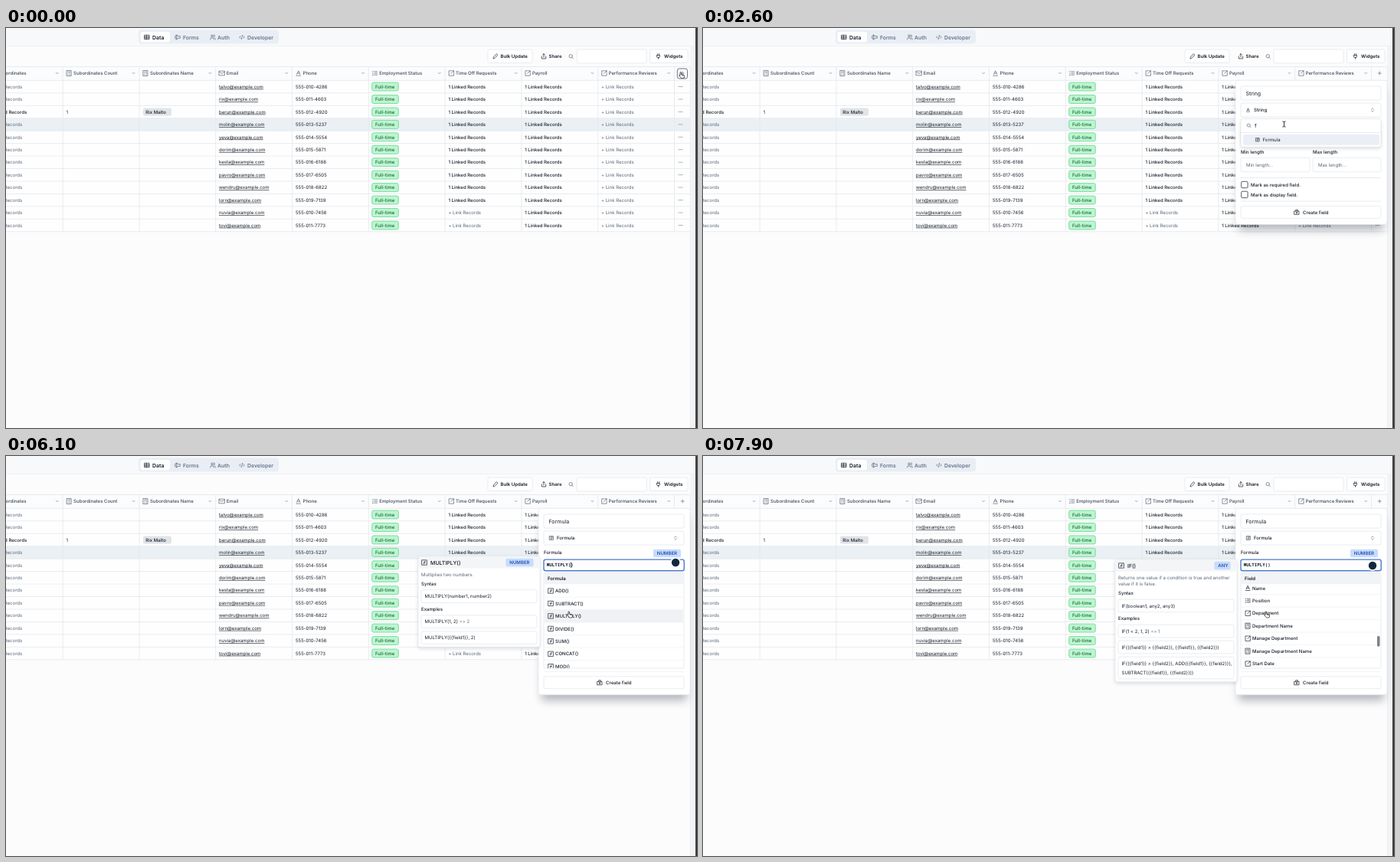
These frames come from a looping animation (902x522 px, 8000 ms). An HTML page:

```html
<!DOCTYPE html>
<html lang="en">
<head>
<meta charset="utf-8">
<title>Employee table</title>
<style>
  html, body { margin: 0; width: 100%; height: 100%; overflow: hidden; background: #fcfcfd; }
  svg { display: block; }
  text { font-family: Inter, sans-serif; font-size: 6.05px; fill: #161d28; white-space: pre;
         text-rendering: geometricPrecision; font-feature-settings: "calt" 0; }
  .med { font-weight: 500; }
  .bold { font-weight: 600; }
  .head { font-weight: 500; fill: #3f4a59; }
  .mute { fill: #596577; }
  .tab { font-weight: 600; font-size: 6.9px; fill: #64748b; }
  .on { fill: #111827; }
  .big { font-size: 7px; }
  .mail { text-decoration: underline; text-decoration-thickness: .5px; }
  .green { font-weight: 500; fill: #17693a; }
  .blue { font-weight: 600; fill: #2450b8; }
  .mono { font-family: "Noto Sans Mono", monospace; font-size: 5.85px; font-weight: 600; }
  .icon { fill: none; stroke-linecap: round; stroke-linejoin: round; }
  .shade { filter: blur(6px); opacity: .3; }
  .tip { filter: drop-shadow(0 2px 2px rgba(20, 30, 50, .14)); }
</style>
</head>
<body>
<svg id="stage" width="902" height="522" viewBox="0 0 902 522"></svg>
<script>
const LINE = '#e3e7ec', PITCH = 16.45, COL = 99.8;
const DARK = '#1f2733', GREY = '#5b6778';

const ICONS = {
  table: 'M3 4h18v16H3zM3 10h18M3 15h18M10 4v16',
  form: 'M8 4v16M5 4h6M5 20h6M12 8h10v8H12M4 8H2v8h2',
  users: 'M13 7a4 4 0 1 1-8 0a4 4 0 1 1 8 0M2 21v-2a4 4 0 0 1 4-4h6a4 4 0 0 1 4 4v2M22 21v-2a4 4 0 0 0-3-4M16 3a4 4 0 0 1 0 8',
  code: 'M18 16l4-4-4-4M6 8l-4 4 4 4M14 4l-4 16',
  pencil: 'M17 3l4 4L8 20l-5 1 1-5z',
  share: 'M4 12v9h16v-9M16 6l-4-4-4 4M12 2v13',
  search: 'M18 11a7 7 0 1 1-14 0a7 7 0 1 1 14 0M21 21l-5-5',
  plug: 'M12 22v-5M9 8V2M15 8V2M6 8h12v5a4 4 0 0 1-4 4h-4a4 4 0 0 1-4-4z',
  calc: 'M4 2h16v20H4zM8 7h8M8 12h.1M12 12h.1M16 12h.1M8 17h.1M12 17h.1M16 17h.1',
  mail: 'M2 4h20v16H2zM2 7l10 6 10-6',
  text: 'M6 16L12 3l6 13M8 12h8M4 21h16',
  list: 'M3 5l1 1 2-2M3 12h3M3 19h3M10 6h11M10 12h11M10 18h11',
  link: 'M12 3H3v18h18v-9M21 3L11 13M15 3h6v6',
  down: 'M6 9l6 6 6-6',
  updown: 'M7 15l5 5 5-5M7 9l5-5 5 5',
  plus: 'M12 5v14M5 12h14',
  dots: 'M5 12h.1M12 12h.1M19 12h.1',
  fn: 'M3 3h18v18H3zM9 17c2 0 3-1 3-4v-3c0-2 1-3 3-3M9 12h6',
  formula: 'M4 4h16v16H4zM9 8h7M9 12h7M9 16h4',
  create: 'M3 8h18v13H3zM8 8V3h8v5M12 11v7M9 14h6'
};

const esc = s => s.replace(/&/g, '&amp;').replace(/</g, '&lt;');
const text = (x, y, s, cls = '', id = '') =>
  `<text x="${x}" y="${y + (/big|tab/.test(cls) ? 2.5 : 2.2)}" class="${cls}" id="${id}">${esc(s)}</text>`;
const box = (x, y, w, h, fill = '#fff', stroke = LINE, r = 2, extra = '') =>
  `<rect x="${x}" y="${y}" width="${w}" height="${h}" rx="${r}" fill="${fill}" stroke="${stroke}" stroke-width=".8" ${extra}/>`;
const line = (x1, y1, x2, y2, c = LINE) =>
  `<path d="M${x1} ${y1}L${x2} ${y2}" stroke="${c}" stroke-width=".8"/>`;
const icon = (name, x, y, c = DARK, size = 8, w = 2.2) =>
  `<path class="icon" d="${ICONS[name]}" stroke="${c}" stroke-width="${w}" transform="translate(${x - size / 2} ${y - size / 2}) scale(${size / 24})"/>`;
const group = (id, ...parts) => `<g id="${id}">${parts.join('')}</g>`;
const tag = (right, y, s, w) =>
  box(right - w, y - 5.2, w, 10.4, '#c7dcfb', 'none') + text(right - w + 4.8, y, s, 'blue');

function topBar() {
  const tabs = [['table', 184, 191, 'Data'], ['form', 224, 231, 'Forms'], ['users', 270, 276, 'Auth'], ['code', 308, 315, 'Developer']];
  return box(0, 0, 902, 23.5, '#f8f9fb', 'none', 0) + line(0, 23.5, 898, 23.5, '#eceff2') +
    box(173, 2.5, 183, 18, '#e9eef4', 'none', 4) + box(175.5, 5, 38.5, 13.5, '#fff', 'none', 3) +
    tabs.map(([i, ix, x, s], n) => icon(i, ix, 12, n ? GREY : DARK) + text(x, 12, s, n ? 'tab' : 'tab on')).join('') +
    box(629, 28, 58, 17.5) + icon('pencil', 639, 37) + text(645.5, 37, 'Bulk Update', 'bold') +
    icon('share', 702, 37) + text(708.5, 37, 'Share', 'bold') +
    icon('search', 737.5, 37, GREY, 7.5) + box(745, 28, 91, 18) +
    box(840.5, 28, 49.5, 17.5) + icon('plug', 851.5, 37) + text(859, 37, 'Widgets', 'bold');
}

const HEADS = [['link', 'Subordinates'], ['calc', 'Subordinates Count'], ['calc', 'Subordinates Name'], ['mail', 'Email'],
  ['text', 'Phone'], ['list', 'Employment Status'], ['link', 'Time Off Requests'], ['link', 'Payroll'], ['link', 'Performance Reviews']];
const USERS = ['talvo', 'rix', 'berun', 'molin', 'yeva', 'dorim', 'kesta', 'pavro', 'wendru', 'lorn', 'nuvia', 'tovi'];

function table() {
  const colX = c => c * COL - 25.7;
  const links = (c, y, on) => text(colX(c) + 4.3, y, on ? '1 Linked Records' : '+ Link Records', on ? 'med' : 'mute');
  let out = box(0, 50.5, 893, 215.5, '#fefefe', 'none', 0) + box(0, 50.5, 893, 17.5, '#fbfcfd', 'none', 0) +
    box(0, 117.9, 893, PITCH, '#ebf0f5', 'none', 0) + line(0, 50.5, 893, 50.5) + line(0, 68.3, 893, 68.3);
  USERS.forEach((user, i) => {
    const y = 76.5 + PITCH * i;
    out += line(0, y + 8.3, 893, y + 8.3) + links(0, y, i === 2) +
      text(278, y, user + '@example.com', 'mail') +
      text(378, y, `555-01${i % 10}-${4286 + i * 317}`) +
      box(477.7, y - 5.5, 34.6, 11, '#bdf5d0', '#62d78c') + text(482, y, 'Full-time', 'green') +
      links(6, y, i < 10) + links(7, y, true) + links(8, y, false) + icon('dots', 880.5, y, DARK, 6.5, 3);
  });
  out += text(78.5, 109.4, '1') + box(179, 104.4, 37, 10, '#e1e4e8', 'none') + text(182.3, 109.4, 'Rix Malto', 'med');
  HEADS.forEach(([i, s], c) => {
    const x = colX(c);
    out += icon(i, x + 8.2, 59, GREY, 8.5, 2) + text(x + 14, 59, s, 'head') + icon('down', x + 92.5, 59, GREY, 5.5, 2.5) +
      line(x + COL, 50.5, x + COL, 265.8);
  });
  return out + icon('plus', 883.2, 59, GREY, 7) + box(893, 24, 6, 498, '#f2f4f6', 'none', 0) + line(893.4, 50.5, 893.4, 522, '#e9ecef') +
    line(899, 0, 899, 522, '#dfe3e7') + box(900, 0, 2, 522, '#3a3c3e', 'none', 0);
}

const createButton = y => box(702, y - 8, 183, 16) + icon('create', 775, y) + text(783, y, 'Create field', 'med');

function stringForm() {
  const input = (x, y, w, s) => box(x, y, w, 18.5) + text(x + 7, y + 9.3, s, 'mute');
  const check = (y, s) => box(702.7, y - 4.2, 8.4, 8.4, '#fff', '#273140', 1.5) + text(715, y, s, 'med');
  return group('stringForm',
    text(708.5, 85, 'String', 'big'), icon('text', 711.5, 107, DARK, 6), text(719, 107, 'String', 'med'),
    text(702, 126.5, 'Default value', 'med'), input(702, 133.2, 183, 'Default value...'),
    text(702, 162, 'Min length', 'med'), input(702, 169.3, 90, 'Min length...'),
    text(796, 162, 'Max length', 'med'), input(796, 169.3, 89, 'Max length...'),
    line(702, 195.5, 885, 195.5), check(204.5, 'Mark as required field.'), check(217.4, 'Mark as display field.'),
    line(702, 226, 885, 226), createButton(240.3));
}

const FUNCS = ('ADD SUBTRACT MULTIPLY DIVIDE SUM CONCAT MOD POWER SQRT ABS ROUND FLOOR CEILING MIN MAX AVERAGE UPPER LOWER ' +
  'TRIM LEFT RIGHT MID LEN REPEAT REPLACE COUNT EXP LOG SIGN TEXT SEARCH SUBSTR AND OR NOT XOR IF SWITCH YEAR MONTH DAY NOW').split(' ');
const FIELDS = [['text', 'Name'], ['list', 'Position'], ['link', 'Department'], ['calc', 'Department Name'],
  ['link', 'Manage Department'], ['calc', 'Manage Department Name'], ['link', 'Start Date'], ['link', 'Manager']];

function formulaForm() {
  const item = (i, n, s) => {
    const y = 172 + PITCH * n;
    return icon(i, 711.2, y, DARK, 8.5, 2) + text(717, y, s, 'med') + line(703, y + 8.2, 884, y + 8.2, '#eff1f4');
  };
  const items = FUNCS.map((s, n) => item('fn', n, s + '()')).join('') +
    text(707, 172 + PITCH * FUNCS.length, 'Field', 'bold') +
    FIELDS.map(([i, s], n) => item(i, FUNCS.length + 1 + n, s)).join('');
  return group('formulaForm',
    text(708.5, 85, 'Formula', 'big'), icon('formula', 712, 107, DARK, 7, 2), text(719, 107, 'Formula', 'med'),
    text(702, 124, 'Formula', 'med', 'label'), group('resultType', tag(881, 127, 'NUMBER', 36)),
    group('body',
      box(702, 148.5, 183, 124.5, '#fff', LINE, 1),
      '<g clip-path="url(#listClip)">',
      group('items', box(703, 163.8, 181, PITCH, '#f0f1f4', 'none', 0, 'id="hot"'), items),
      box(702.5, 149, 182, 14.3, '#f1f3f6', 'none', 0), text(707, 156.2, 'Formula', 'bold', 'section'),
      box(880, 149, 3.5, 14, '#7e8288', 'none', 1.7, 'id="thumb"'), '</g>',
      line(702, 277.5, 885, 277.5, '#eef0f3'), createButton(291.7),
      box(702, 131.1, 183.2, 14.6, '#fff', LINE, 2.5, 'id="editor"'),
      text(705.8, 138, 'MULTIPLY()', 'mono', 'code'),
      '<path id="caret" stroke="#111827" stroke-width=".8"/>'),
    group('badge', '<circle cx="874" cy="139" r="6.8" fill="#fff" stroke="#e3e7ec" stroke-width=".6"/><circle cx="874" cy="139" r="5.2" fill="#12283a"/>'));
}

const TYPES = [['text', 'String'], ['list', 'Number'], ['calc', 'Date'], ['list', 'Rating'], ['mail', 'Email'], ['link', 'URL'],
  ['create', 'Checkbox'], ['list', 'Select'], ['link', 'Attachment'], ['users', 'User']];

function dropdown() {
  const option = ([i, s], n) => icon(i, 724, 145.8 + 14 * n, DARK, 6.5) + text(730.5, 145.8 + 14 * n, s);
  return group('dropdown',
    box(702, 118.5, 183, 36.7, '#fff', LINE, 3, 'id="dropBox" class="tip"'),
    icon('search', 712.5, 127.3, GREY, 7), text(720, 127.3, '', 'big', 'query'), line(702, 136.5, 885, 136.5),
    box(705, 138.8, 178, 14, '#eaeff5', 'none'),
    group('allTypes', ...TYPES.map(option)), group('match', option(['formula', 'Formula'], 0)));
}

// Lines of one example are separated by \n; a trailing "=> value" is muted.
function tooltip(id, name, type, desc, syntax, examples) {
  const sample = (y, s) => {
    const rows = s.split('\n');
    const label = (row, n) => {
      const [call, result] = row.split(' => ');
      const mark = result ? `<tspan fill="#6b7687"> => ${result}</tspan>` : '';
      return text(546.5, y + 12 * n, call).replace('</text>', mark + '</text>');
    };
    return box(542, y - 8.3, 151, 16.6 + 12 * (rows.length - 1)) + rows.map(label).join('');
  };
  let y = 154.6 + 8.4 * (desc.length - 1);
  let out = desc.map((s, n) => text(542, 154.6 + 8.4 * n, s, 'mute')).join('');
  out += text(542, y += 12.2, 'Syntax', 'med') + sample(y += 16.2, syntax) + text(542, y += 16.4, 'Examples', 'med');
  y -= 4.3;
  examples.forEach(s => {
    out += sample(y += 21, s);
    y += 12 * (s.split('\n').length - 1);
  });
  return group(id, box(538, 131, 159, y + 12.2 - 131, '#fff', LINE, 3, 'class="tip"'),
    box(538.5, 131.5, 158, 15, '#f3f5f7', 'none', 2), icon('fn', 546.2, 139, DARK, 8.5, 2),
    text(554, 139, name, 'big med'), tag(688.5, 139, type, type.length * 5 + 6), out);
}

const PANEL = group('panel',
  box(699, 82, 190, 182, '#101828', 'none', 3, 'id="shade" class="shade"'),
  box(695, 68.3, 198, 188, '#fff', '#e6e9ee', 3, 'id="sheet"'),
  box(702, 76, 183, 18), box(702, 98, 183, 18, '#fff', LINE, 2, 'id="select"'), icon('updown', 874, 107, GREY, 7),
  stringForm(), formulaForm(), dropdown());

const TIPS = group('tips',
  tooltip('tip2', 'MULTIPLY()', 'NUMBER', ['Multiplies two numbers.'], 'MULTIPLY(number1, number2)',
    ['MULTIPLY(1, 2) => 2', 'MULTIPLY({{field1}}, 2)']),
  tooltip('tip30', 'SEARCH()', 'NUMBER', ['Returns the position of a substring within a string.'], 'SEARCH(string1, string2)',
    ["SEARCH('Hello', 'e') => 1", "SEARCH({{field1}}, 'e')"]),
  tooltip('tip36', 'IF()', 'ANY', ['Returns one value if a condition is true and another', 'value if it is false.'], 'IF(boolean1, any2, any3)',
    ['IF(1 < 2, 1, 2) => 1', 'IF({{field1}} > {{field2}}, {{field1}}, {{field2}})',
      'IF({{field1}} > {{field2}}, ADD({{field1}}, {{field2}}),\nSUBTRACT({{field1}}, {{field2}}))']));

const CURSOR = group('cursor',
  group('hand', '<path transform="scale(.4) translate(-12 -12)" fill="#fff" stroke="#222" stroke-width="2" stroke-linejoin="round" d="M7 13V4a2 2 0 0 1 4 0v6l7 1.4q3 .6 3 3.6v2q0 5-5 5h-3q-3 0-5-3l-4-5q-1-2 1-2.5zM14 11v3M17.5 12v3"/>'),
  group('beam', '<path fill="none" stroke="#222" stroke-width=".9" d="M-2-3.6Q0-3.6 0-2.5V2.5Q0 3.6-2 3.6M2-3.6Q0-3.6 0-2.5M2 3.6Q0 3.6 0 2.5"/>'));

document.getElementById('stage').innerHTML =
  '<defs><clipPath id="listClip"><rect x="702" y="148.8" width="183" height="124"/></clipPath></defs>' +
  box(0, 0, 902, 522, '#fcfcfd', 'none', 0) + topBar() + table() +
  box(876.3, 53, 13.2, 13, 'none', '#4b5563', 2.5, 'id="addHover"') + PANEL + TIPS + CURSOR;

const $ = id => document.getElementById(id);
const show = (id, on) => { $(id).style.display = on ? '' : 'none'; };
const set = (id, name, value) => $(id).setAttribute(name, value);
const move = (id, x, y) => set(id, 'transform', `translate(${x} ${y})`);
const ease = p => p * p * (3 - 2 * p);

function track(keys, t, curve = p => p) {
  const n = keys.findIndex(k => k[0] > t);
  if (n < 0) return keys[keys.length - 1].slice(1);
  const a = keys[n - 1], b = keys[n], p = curve((t - a[0]) / (b[0] - a[0]));
  return a.slice(1).map((v, i) => v + (b[i + 1] - v) * p);
}

const POINTER = [[0, 882, 61.5], [700, 882, 61.5], [1500, 757.5, 114], [2250, 757.5, 114], [2450, 758.5, 125.5], [3750, 758.5, 125.5],
  [3980, 748, 146], [4200, 748, 146], [4600, 744, 141.5], [5450, 744, 141.5], [5750, 736, 207]];
const SCROLL = [[0, 0], [6400, 0], [6900, 420], [7100, 491], [7300, 563], [7400, 580], [7700, 697], [7900, 711]];

function draw(t) {
  const open = t >= 400, formula = t >= 4050, focus = t >= 4800, picked = t >= 5950, settled = t >= 6500;
  const dy = picked ? 4 : 0;
  const height = formula ? 239.3 + dy : 188;

  show('addHover', t < 850);
  show('panel', open);
  set('sheet', 'height', height);
  set('shade', 'height', height - 6);
  set('select', 'fill', t >= 1350 && t < 2250 ? '#eaf0f7' : '#fff');
  show('stringForm', !formula);
  show('formulaForm', formula);

  const typed = Math.max(0, Math.min(5, Math.floor((t - 2500) / 230) + 1));
  show('dropdown', t >= 2200 && !formula);
  set('dropBox', 'height', typed ? 36.7 : 162);
  $('query').textContent = 'formu'.slice(0, typed) || 'Search...';
  $('query').style.fill = typed ? '' : '#6b7687';
  show('allTypes', !typed);
  show('match', typed);

  move('label', 0, dy / 2);
  move('body', 0, dy);
  show('resultType', picked);
  show('code', picked);
  set('editor', 'stroke', focus ? '#4a7bcb' : LINE);
  set('editor', 'stroke-width', focus ? 1.4 : .8);
  const caretX = picked ? 737.6 : 706.2;
  set('caret', 'd', `M${caretX} 134.5V141.8`);
  show('caret', focus && (t - (picked ? 5950 : 4800)) % 1000 < 500);
  show('badge', focus);
  move('badge', 0, settled ? 4 : 0);

  const [scroll] = track(SCROLL, t);
  const hot = t < 5700 ? -1 : t < 6950 ? 2 : t < 7300 ? 30 : 36;
  move('items', 0, -scroll);
  show('hot', hot >= 0);
  set('hot', 'y', 163.8 + PITCH * hot);
  $('section').textContent = scroll > PITCH * FUNCS.length ? 'Field' : 'Formula';
  show('thumb', scroll > 0);
  set('thumb', 'y', 149 + scroll * .115);
  move('tips', 0, settled ? 4 : 0);
  [2, 30, 36].forEach(n => show('tip' + n, n === hot));

  const beam = (t >= 2350 && t < 3880) || (t >= 4300 && t < 5520);
  move('cursor', ...track(POINTER, t, ease));
  show('beam', beam);
  show('hand', !beam);
}

const start = performance.now();
function tick() {
  draw((performance.now() - start) % 8000);
  requestAnimationFrame(tick);
}
tick();
</script>
</body>
</html>
```
